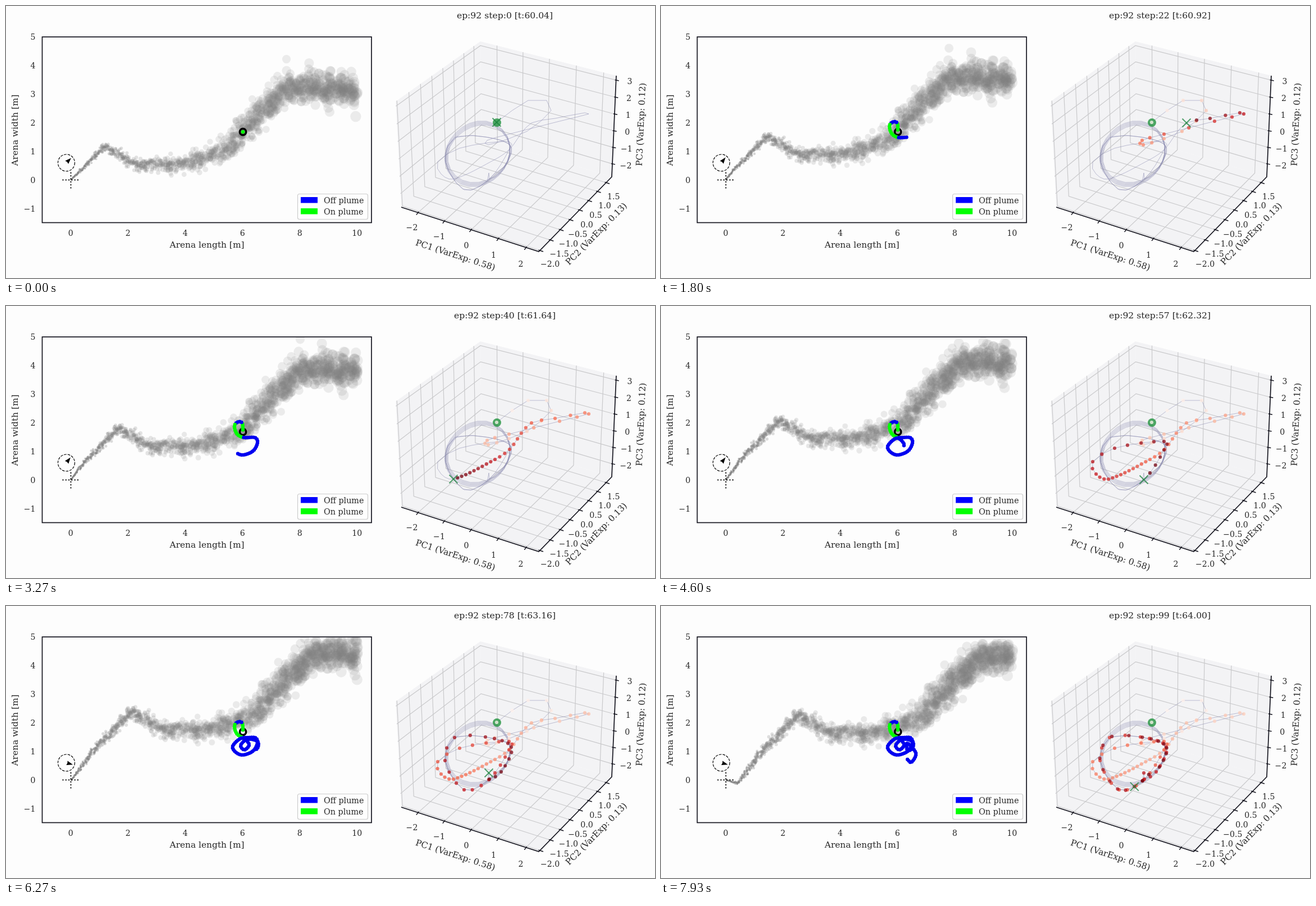
Animation, 1156 px wide and 484 px high, one loop 8 s. Source, as an HTML page with a canvas:

```html
<!DOCTYPE html>
<html>
<head>
<meta charset="utf-8">
<style>
html, body { margin: 0; height: 100%; overflow: hidden; background: #fdfdfd; }
canvas { display: block; width: 1156px; height: 484px; }
</style>
</head>
<body>
<canvas id="c" width="1156" height="484"></canvas>
<script>
const g = document.getElementById('c').getContext('2d');
const INK = '#262626', EDGE = '#15151f', LOOP = 8000, TAU = 2 * Math.PI;
const START = [422, 224], SOURCE = [115.5, 309.5];

const range = n => [...Array(n).keys()];
const mix = (a, b, f) => a.map((v, i) => v + (b[i] - v) * f);
const segment = (keys, t) => {
  let i = 0;
  while (i < keys.length - 2 && keys[i + 1][0] <= t) i++;
  return i;
};
const linear = (keys, t) => {
  const [a, b] = keys.slice(segment(keys, t));
  return mix(a, b, (t - a[0]) / (b[0] - a[0])).slice(1);
};
// Cubic through keys of [time, x, y]
const spline = (keys, t) => {
  const i = segment(keys, t), a = keys[i], b = keys[i + 1];
  const p = keys[i - 1] || a, q = keys[i + 2] || b;
  const h = b[0] - a[0], f = (t - a[0]) / h;
  return [1, 2].map(k => {
    const m = (b[k] - p[k]) / (b[0] - p[0]) * h, n = (q[k] - a[k]) / (q[0] - a[0]) * h;
    const d = b[k] - a[k];
    return a[k] + f * (m + f * (3 * d - 2 * m - n + f * (m + n - 2 * d)));
  });
};

// The agent walks this curve at constant speed
const bends = [
  START, [421, 209], [414, 206], [407, 213], [411, 227], [423, 234], [443, 234], [448, 243],
  [440, 258], [422, 265], [409, 260], [404, 249], [420, 235], [433, 246], [425, 256], [418, 248],
  [430, 237], [448, 241], [448, 253], [439, 257], [439, 244], [454, 262], [446, 278], [439, 273]];
const walk = bends.map((p, i) => [i, ...p]);
const fine = range(921).map(i => spline(walk, i / 40));
let far = 0;
const miles = fine.map((p, i) => [far += i && Math.hypot(p[0] - fine[i - 1][0], p[1] - fine[i - 1][1]), ...p]);
const track = range(100).map(i => linear(miles, far * i / 99));

// Network state: one excursion, then a limit cycle whose laps repeat
const neural = [
  [0, 874, 207], [2, 930, 168], [3, 963, 168], [4, 971, 186], [6, 928, 223], [7, 896, 236],
  [9, 859, 247], [11, 857, 239], [13, 896, 228], [15, 986, 205], [17, 1038, 192], [18, 1031, 190],
  [20, 978, 200], [22, 936, 208], [27, 897, 255], [30, 871, 273], [40, 797, 308], [43, 775, 299],
  [45, 769, 277], [47, 808, 253], [51, 896, 241], [53, 896, 256], [57, 860, 309], [60, 816, 327],
  [63, 782, 275], [65, 799, 234], [67, 854, 233], [71, 900, 251], [75, 882, 295], [77, 861, 308],
  [78, 860, 297]];
const states = range(100).map(s => spline(neural, s < 79 ? s : s < 97 ? s - 21.8 : s - 40.8));

// Accumulated wind drift: [seconds, x, y]
const drift = [
  [-26, -550, 155], [-19, -385, 167], [-12.7, -275, 52], [-9.7, -205, 29],
  [-6, -117, 26], [-3.4, -61, 60], [0, 0, 0], [3.08, 47.5, -62], [4.08, 72, -55]];
let seed = 7;
const rnd = () => (seed = (seed * 16807) % 2147483647) / 2147483647;
const gauss = () => Math.sqrt(-2 * Math.log(rnd())) * Math.cos(TAU * rnd());
const puffs = range(1680).map(i => ({ birth: -26 + i / 56, dx: gauss(), dy: gauss() }));

function line(pts, color, width, fill) {
  g.beginPath();
  pts.forEach(p => g.lineTo(...p));
  if (fill) { g.fillStyle = fill; g.fill(); }
  if (width) { g.strokeStyle = color; g.lineWidth = width; g.stroke(); }
}
function dot([x, y], r, color) {
  g.fillStyle = color;
  g.beginPath();
  g.arc(x, y, r, 0, TAU);
  g.fill();
}
function ring([x, y], r, width) {
  g.strokeStyle = '#000';
  g.lineWidth = width;
  g.beginPath();
  g.arc(x, y, r, 0, TAU);
  g.stroke();
}
function text(s, x, y, size = 14.1, align = 'center', turn = 0) {
  g.save();
  g.translate(x, y);
  g.rotate(turn * Math.PI / 180);
  g.font = size + 'px "DejaVu Serif", "Noto Serif", serif';
  g.textAlign = align;
  g.fillStyle = INK;
  g.fillText(String(s).replace('-', '−'), 0, 0);
  g.restore();
}

function plume(t) {
  const now = linear(drift, t), peak = linear(drift, Math.min(t, 3.08));
  for (const p of puffs) {
    const age = t - p.birth;
    if (age <= 0) continue;
    const from = linear(drift, p.birth), spread = 1.3 * age ** .75;
    const x = SOURCE[0] + now[0] - from[0] + p.dx * spread;
    const y = SOURCE[1] + now[1] - from[1] + p.dy * spread;
    if (x > 626 || y + peak[1] - now[1] < 57) continue;
    dot([x, y], 1.3 + .33 * age, `rgba(128,128,128,${.14 + .36 * Math.exp(-age / 4)})`);
  }
}

function arena(step) {
  g.save();
  g.beginPath();
  g.rect(64, 55, 587, 330);
  g.clip();
  plume(step * .04);
  g.restore();

  const [sx, sy] = SOURCE;
  g.setLineDash([2, 3.3]);
  line([[sx - 15, sy], [sx + 15, sy]], '#000', 2);
  line([[sx, sy + 15], [sx, sy - 15]], '#000', 2);
  g.setLineDash([4.6, 2]);
  ring([107.5, 279], 15, 1.2);
  g.setLineDash([]);
  g.save();
  g.translate(107.5, 279);
  g.rotate((step < 1 ? -45 : step < 77 ? -52 : 16) * Math.PI / 180);
  line([[12, 0], [1, -4], [2, 0], [1, 4]], 0, 0, '#000');
  g.restore();

  ring(START, 5.6, 3.6);
  for (let i = step ? 1 : 0; i <= step; i++)
    dot(track[i], 3.2, i < 5 || i > 8 && i < 18 ? '#0f0' : '#0000f0');

  g.strokeStyle = EDGE;
  g.lineWidth = 1.7;
  g.strokeRect(64.5, 55, 586.5, 330.5);
  for (let v = 0; v <= 10; v += 2) text(v, 115.3 + v * 51, 409);
  for (let v = -1; v <= 5; v++) text(v, 52.5, 315 - v * 51, 14.1, 'right');
  text('Arena length [m]', 358, 430, 15.4);
  text('Arena width [m]', 21, 221, 15.4, 'center', -90);

  g.fillStyle = 'rgba(255,255,255,.8)';
  g.strokeStyle = '#ccc';
  g.lineWidth = 1.2;
  g.beginPath();
  g.roundRect(519.5, 334.5, 125, 45, 3);
  g.fill();
  g.stroke();
  [['Off plume', '#00f', 340], ['On plume', '#0f0', 360]].forEach(([s, color, y]) => {
    g.fillStyle = color;
    g.fillRect(525, y, 30, 10.5);
    text(s, 566, y + 11, 14.3, 'left');
  });
}

function box() {
  const back = [845, 63], left = [694, 170], leftLow = [704, 358], front = [949, 437];
  const rightLow = [1079, 304], right = [1087, 124], backLow = [847, 234];
  const wall = (...p) => line(p, 0, 0, '#f3f3f5');
  wall(left, back, backLow, leftLow);
  wall(back, right, rightLow, backLow);
  wall(leftLow, backLow, rightLow, front);
  const grid = (f, a, b, c, d, e, h) =>
    line([mix(a, b, f), mix(c, d, f), mix(e, h, f)], '#c9c9cb', 1.2);
  const xs = range(5).map(i => .122 + .19 * i + .0016 * i * i);
  const ys = range(8).map(i => .015 + .143 * i - .0019 * i * i);
  const zs = range(6).map(i => .044 + .169 * i - .0007 * i * i);
  xs.forEach(f => grid(f, leftLow, front, backLow, rightLow, back, right));
  ys.forEach(f => grid(f, front, rightLow, leftLow, backLow, left, back));
  zs.forEach(f => grid(f, left, leftLow, back, backLow, right, rightLow));
  line([leftLow, front, rightLow, right], EDGE, 1.7);
  const tick = (a, b, f, dx, dy) => {
    const [x, y] = mix(a, b, f);
    line([[x - dx * .4, y - dy * .4], [x + dx, y + dy]], EDGE, 1.5);
  };
  xs.forEach((f, i) => {
    tick(leftLow, front, f, -3, 4);
    text(i - 2, 723 + i * 48.5, 399 + i * 16.2);
  });
  ys.forEach((f, i) => {
    tick(front, rightLow, f, 6, 2);
    text((i / 2 - 2).toFixed(1), 969 + i * 16.6 - i * i * .06, 464 - i * 18 + i * i * .12);
  });
  zs.forEach((f, i) => {
    tick(right, rightLow, f, 5, 1);
    text(3 - i, 1111 - i * 1.4, 139 + i * 30);
  });
  text('PC1 (VarExp: 0.58)', 799, 448, 15.3, 'center', 17.9);
  text('PC2 (VarExp: 0.13)', 1055, 409, 15.3, 'center', -45.5);
  text('PC3 (VarExp: 0.12)', 1136, 211, 15.3, 'center', -87.5);
}

const REDS = [[255, 245, 240], [252, 187, 161], [251, 106, 74], [203, 24, 29], [103, 0, 13]];
function reds(f) {
  const i = Math.min(3, Math.floor(f * 4));
  return `rgba(${mix(REDS[i], REDS[i + 1], f * 4 - i).map(Math.round)},.75)`;
}

function space(step) {
  box();
  const thin = 'rgba(135,135,175,.65)';
  line(states, thin, .8);
  // Further laps of the limit cycle
  for (let k = 0; k < 5; k++)
    line(range(25).map(i => {
      const a = TAU * i / 24, r = 58 - 4 * Math.sin(2 * a) - k * .8;
      return [840 + k * .5 + r * Math.cos(a), 263 + (r - k) * Math.sin(a)];
    }), thin, .8);
  dot([874.5, 207.5], 7.5, 'rgba(34,146,62,.8)');
  for (let i = 0; i < step; i++) dot(states[i], 3.1, reds(i / step));
  const [x, y] = states[step];
  for (const s of [-7.5, 7.5])
    line([[x - 7.5, y - s], [x + 7.5, y + s]], 'rgba(25,130,60,.75)', 1.9);
  text(`ep:92 step:${step} [t:${(60.04 + .04 * step).toFixed(2)}]`, 888.5, 21.5, 15.6);
}

let shown = -1;
function frame() {
  const tick = Math.floor((performance.now() % LOOP + 5) * 15 / 1000);
  const step = Math.min(99, Math.floor(tick * 5 / 6));
  if (step !== shown) {
    shown = step;
    g.fillStyle = '#fdfdfd';
    g.fillRect(0, 0, 1156, 484);
    arena(step);
    space(step);
  }
  requestAnimationFrame(frame);
}
frame();
</script>
</body>
</html>
```
